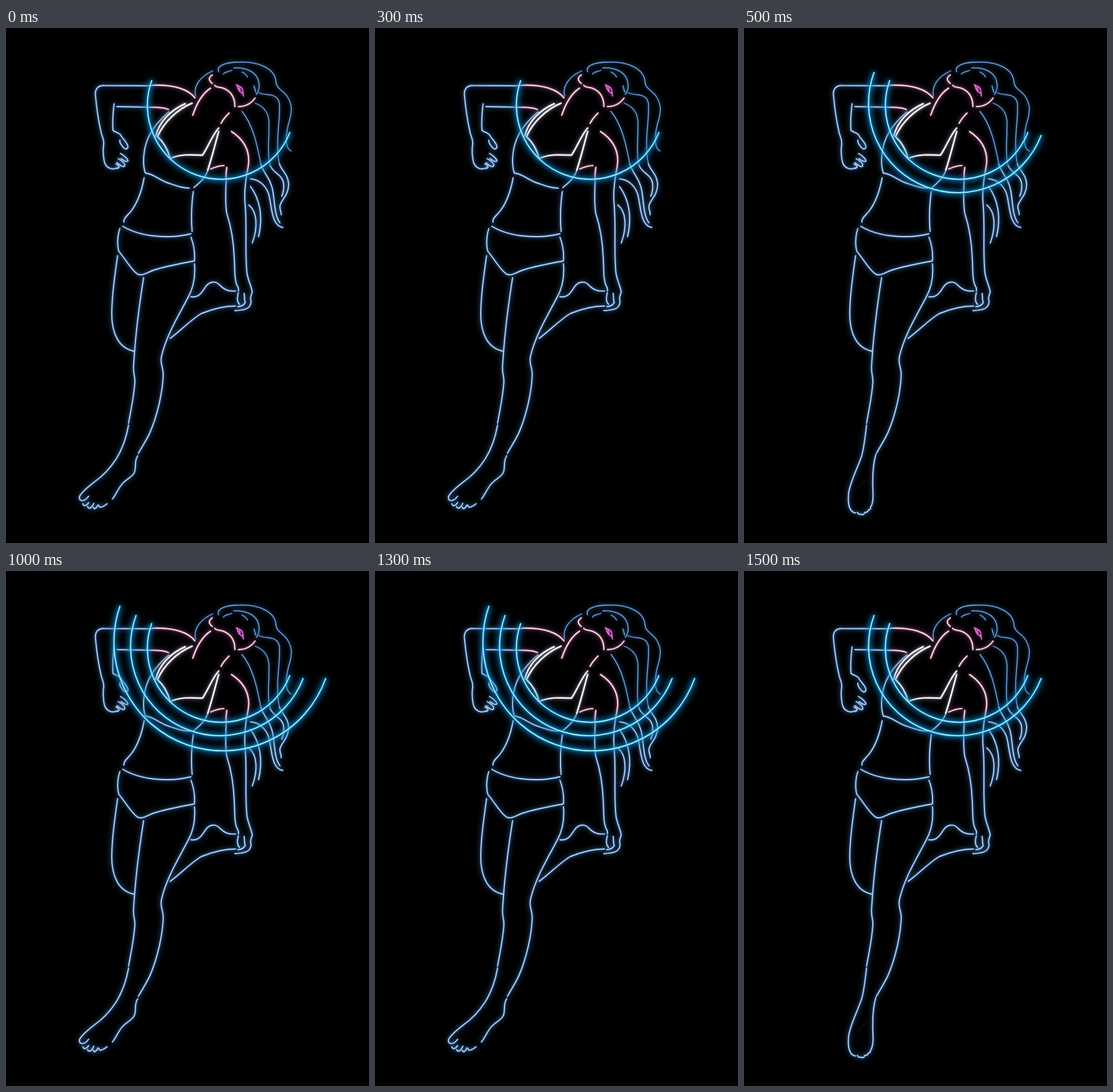
An HTML page for the animation above (2 s loop, 628 px wide and 891 px high).

```html
<!DOCTYPE html>
<html lang="en">
<head>
<meta charset="utf-8">
<title>Neon dancer</title>
<style>
html, body { margin: 0; width: 100%; height: 100%; overflow: hidden; background: #000; }
svg { display: block; width: 628px; height: 891px; }
path { fill: none; stroke-linecap: round; stroke-linejoin: round; }
.body { stroke: #b4d6f8; stroke-width: 1.9; filter: drop-shadow(0 0 1.5px #4a80bd) drop-shadow(0 0 4px #3468ac); }
.hair { stroke: #86b9ea; stroke-width: 1.3; filter: drop-shadow(0 0 1.5px #2d65a6) drop-shadow(0 0 3.5px #22508c); }
.pink { stroke: #ffdcee; stroke-width: 2.1; filter: drop-shadow(0 0 1.5px #c273a2) drop-shadow(0 0 4px #7d3f68); }
.top { stroke: #fff; stroke-width: 2.5; filter: drop-shadow(0 0 1.5px #94889c) drop-shadow(0 0 4px #665a70); }
.eye { stroke: #ff9cf2; stroke-width: 1.4; filter: drop-shadow(0 0 1.5px #c81cae) drop-shadow(0 0 3px #6a1060); }
.ring { stroke: #a5ecff; stroke-width: 2; filter: drop-shadow(0 0 1.5px #00aaf0) drop-shadow(0 0 4px #0098e0) drop-shadow(0 0 6px #006fae); }
.shade { stroke: #0c0c1c; stroke-width: 3; filter: blur(1.5px); }

.side { animation: side 1s step-end infinite; }
.front { animation: front 1s step-end infinite; }
.second { animation: second 2s step-end infinite; }
.third { animation: third 2s step-end infinite; }
@keyframes side { 0% { opacity: 1 } 50%, 100% { opacity: 0 } }
@keyframes front { 0% { opacity: 0 } 50%, 100% { opacity: 1 } }
@keyframes second { 0% { opacity: 0 } 25%, 100% { opacity: 1 } }
@keyframes third { 0% { opacity: 0 } 50% { opacity: 1 } 75%, 100% { opacity: 0 } }
</style>
</head>
<body>
<svg viewBox="0 0 628 891">
  <g class="hair">
    <path d="M328 118C324 101 335 84 358 74"/>
    <path d="M368 76C364 67 375 59 405 59C441 58 465 72 467 92C467 105 480 108 487 119C495 132 495 142 491 158C484 180 481 208 494 213"/>
    <path d="M376 80C378 76 385 76 391 73M394 69C416 68 433 76 437 92C439 101 438 109 433 115M408 76Q415 79 418 85M429 100L432 111"/>
    <path d="M438 112C450 118 469 111 473 130C475 150 469 180 470 205Q470 222 473 235"/>
    <path d="M431 130C447 136 455 147 455 165C455 195 452 222 457 238"/>
    <path d="M408 144C428 168 435 205 441 236"/>
  </g>
  <g class="body">
    <path d="M473 235C476 246 488 253 489 270C489 290 475 298 474 308C473 315 477 318 476 323"/>
    <path d="M457 238C463 252 476 252 480 267Q482 280 477 291"/>
    <path d="M441 236C446 252 459 262 462 284C465 304 465 326 474 337"/>
    <path d="M423 261C440 262 453 276 456 294C460 315 461 343 479 345"/>
    <path d="M423 274C440 298 445 326 437 361M420 306C435 318 436 345 426 372"/>

    <path d="M252 100L170 99.500C158 99 153 107 155 119C157 140 161 165 164 178C165 187 170 191 169 201C167 213 169 228 171 234C175 243 184 246 192 242"/>
    <path d="M192 136L247 137M187 131C185 147 184 162 185 177C189 181 198 181 200 188C205 195 211 200 211 206C209 212 204 209 201 204Q196 198 197 194"/>
    <path d="M198 217C205 221 211 227 211 230Q208 233 199 226M194 226C201 230 207 235 205 239Q202 242 192 233M190 235Q200 241 192 243"/>

    <path d="M282 145C266 159 252 176 246 190C237 211 236 236 241 251C255 252 263 262 280 268C295 273 305 277 317 277"/>
    <path d="M349 247C344 260 335 268 325 276M239 259C235 281 229 300 217 316C210 325 203 329 204 336M324 283C321 305 320 330 322 352"/>
    <path d="M202 343C225 357 255 361 280 361C300 361 312 358 320 356M320 362C325 375 327 390 326 403C305 407 282 411 262 417C245 421 238 430 228 426C218 420 208 402 195 386C192 375 193 358 197 347"/>

    <path d="M193 394C188 430 183 465 183 495C183 530 196 554 221 559"/>
    <path d="M238 432C232 470 224 530 221 580C219 598 223 598 223 612C221 640 215 666 212 684"/>
    <path d="M326 408C328 430 324 450 315 466C300 495 278 530 269 568C266 582 272 585 272 600C271 630 262 670 249 700C243 713 235 725 229 736"/>
    <path d="M284 537C304 522 322 503 338 494C355 487 377 481 397 481M320 465C334 467 339 457 345 448C352 438 363 437 370 445C378 453 385 456 397 455"/>

    <path d="M381 262C380 282 379 305 382 321C390 345 394 372 395 400C396 420 395 435 400 446Q403 450 402 455"/>
    <path d="M417 250C413 275 412 290 414 310C417 350 413 390 417 425C420 440 425 448 426 457C424 463 422 466 424 474C423 485 415 488 396 489"/>
    <path d="M402 458C400 466 399 473 404 478M412 459C413 467 412 471 414 475Q410 482 401 482"/>
  </g>

  <g class="body side">
    <path d="M212 687C208 710 202 727 191 745C180 762 168 775 152 786C143 793 130 803 127 811C126 820 136 820 143 810"/>
    <path d="M228 740C221 750 226 760 222 769C219 777 208 780 200 790C193 799 190 808 184 815"/>
    <path d="M133 823C134 829 140 826 143 821M141 828C144 834 149 829 152 822M151 829C152 834 157 831 159 825M161 826C161 832 169 828 175 823"/>
  </g>
  <g class="front">
    <path class="shade" d="M197 796Q203 786 214 781"/>
    <g class="body">
      <path d="M212 687C210 705 207 730 203 742C196 762 183 787 181 805C179 825 183 838 193 839"/>
      <path d="M228 738C223 755 222 775 223 800C224 815 222 825 219 829M196 838Q199 843 203 841Q207 844 209 838Q215 838 215 834Q219 834 219 829"/>
    </g>
  </g>

  <g class="pink">
    <path d="M253 99C285 98 313 103 327 121M247 137C265 137 275 138 281 141"/>
    <path d="M357 81C350 86 350 90 357 96M361 99C364 104 370 101 378 105C391 111 396 122 396 136M402 136C413 136 424 131 431 121"/>
    <path d="M354 104C340 113 330 130 323 151M386 147C380 153 375 159 372 165"/>
    <path d="M390 179C410 192 420 208 420 230Q419 242 417 250M354 244C363 240 370 238 377 238M382 241Q380 252 381 262"/>
  </g>
  <g class="eye">
    <path d="M398 98C402 101 408 101 409 106C411 110 409 114 411 118M400 100C401 107 404 111 410 113M403 103Q405 105 405 108"/>
  </g>
  <g class="top">
    <path d="M310 131C285 142 265 162 259 187M322 130C298 140 274 161 262 188C272 197 280 210 284 226C300 218 320 219 340 220C350 205 357 185 368 173M368 179C362 200 356 225 349 246"/>
  </g>

  <path class="ring" d="M252 91A127.710 127.710 0 0 0 491 181"/>
  <path class="ring second" d="M225 77A154.440 154.440 0 0 0 514 186"/>
  <path class="ring third" d="M197 61A188.657 188.657 0 0 0 553 186"/>
</svg>
</body>
</html>
```
